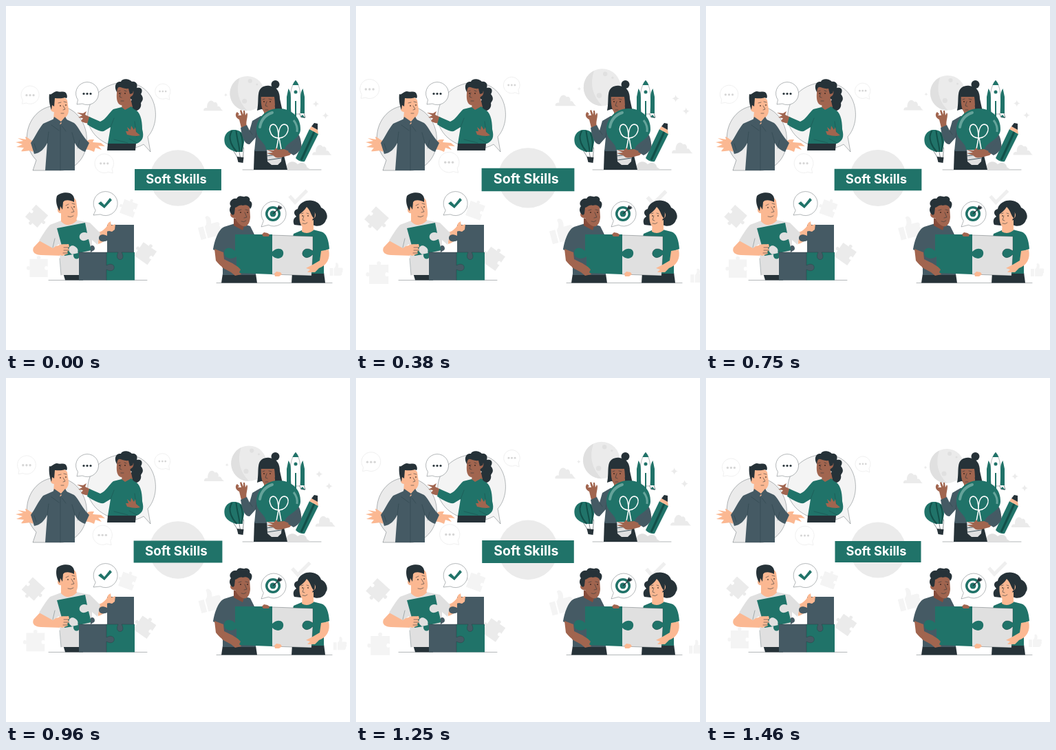
Animation, 500 px wide and 500 px high, one loop 1.54 s. Source, as an HTML page:

```html
<!DOCTYPE html>
<html lang="en">
<head>
<meta charset="utf-8">
<title>Soft Skills</title>
<style>
html, body { margin: 0; width: 100%; height: 100%; overflow: hidden; background: #fff }
svg { display: block; width: 100vw; height: 100vh }
.green { fill: #207369 } .slate { fill: #455a64 } .dark { fill: #263238 }
.peach { fill: #fbb892 } .brown { fill: #a1654f } .deep { fill: #854c3b }
.g1 { fill: #e0e0e0 } .g2 { fill: #ebebeb } .g3 { fill: #f4f4f4 } .white { fill: #fff }
.pen, .ground { fill: none; stroke: #263238; stroke-width: .55; stroke-linecap: round; stroke-linejoin: round }
.ground, .seam { stroke-width: .35 }
.fold { fill: none; stroke: #1b343b; stroke-width: .45; stroke-linecap: round; opacity: .7 }
.bubble { stroke: #263238; stroke-width: .35 }
.pale { fill: #fff; stroke: #ededed; stroke-width: .8 }
text { font: 700 18.2px Inter, sans-serif; fill: #fff; text-anchor: middle }
</style>
</head>
<body>
<svg viewBox="0 0 500 500">
<defs>
  <path id="piece" d="M-13-13H-2C-6-19 6-19 2-13H13V-2C7-6 7 6 13 2V13H-13V2C-19 6-19-6-13-2Z"/>
  <g id="dots"><circle cx="-5" r="1.6"/><circle r="1.6"/><circle cx="5" r="1.6"/></g>
  <path id="star" d="M0-5Q.7-.7 5 0Q.7.7 0 5Q-.7.7-5 0Q-.7-.7 0-5"/>
  <path id="cloud" d="M-14 7C-15 3-10 2-9 3C-10-6-3-11 1-5C4-7 7-3 6 1C10-1 10 5 14 7Z"/>
  <path id="thumb" d="M-15-3H-7V15H-15ZM-5-2C-1-5 0-9-1-15C4-19 8-11 5-4L14-4C18-3 17 2 15 2C18 4 16 8 14 8C16 11 13 15 10 15H-5Z"/>
</defs>

<g id="zoom">
  <g class="g2">
    <circle cx="250" cy="250" r="40.500"/>
    <circle cx="350" cy="128" r="25"/>
    <use href="#cloud" x="301" y="146"/>
    <use href="#cloud" x="458" y="210"/>
    <use href="#star" x="449" y="143"/><use href="#star" x="463" y="160"/>
    <use href="#star" transform="translate(319 130)scale(.5)"/>
    <use href="#piece" transform="translate(46 305)rotate(222)scale(.9)"/>
    <use href="#piece" transform="translate(203 359)rotate(35)scale(.9)"/>
  </g>
  <g class="g1">
    <path d="M339 105.500A25 25 0 0 0 350 153Q330 132 339 105.500Z"/>
    <circle cx="346" cy="139" r="3.500"/><circle cx="354" cy="110" r="3"/><circle cx="364" cy="115" r="1.500"/>
  </g>
  <g class="g3">
    <use href="#piece" x="49" y="380"/>
    <use href="#piece" transform="translate(179 294)rotate(20)scale(.8)"/>
    <use href="#thumb" transform="translate(294 321)rotate(-15)"/>
    <use href="#thumb" transform="translate(478 382)scale(.6)"/>
  </g>
  <path d="M411 276L419 285L436 268" fill="none" stroke="#efefef" stroke-width="5"/>
  <g class="pale">
    <path d="M25.900 137.500A13 13 0 1 1 31 141.800L25 143Z"/>
    <path d="M237 131.300A11 11 0 1 0 232.600 135L238 137Z"/>
    <path d="M154.700 236.900A13.700 13.700 0 1 0 149.300 241.400L156 243Z"/>
  </g>
  <g fill="#d6d6d6">
    <use href="#dots" x="36.500" y="130.500"/><use href="#dots" transform="translate(228 125)scale(.85)"/>
    <use href="#dots" x="143.500" y="229"/>
  </g>
  <path class="green" d="M187.500 237H312.500V268H187.500Z"/>
  <text x="247.500" y="258">Soft Skills</text>
</g>

<g id="talk">
  <path class="g2 bubble" d="M39 239L44 224C15 194 36 145 73 145C105 145 123 178 116 207C112 225 98 237 82 239Z"/>
  <path class="g3 bubble" d="M210 212L206 190C228 166 219 111 172 111C135 112 113 143 120 171C128 196 155 207 178 207C187 207 195 204 200 201Z"/>
  <path class="white bubble" d="M104.500 136.500A16.500 16.500 0 1 1 111 142L103 143Z"/>
  <use class="dark" href="#dots" x="118" y="127.500"/>

  <path class="peach" d="M43 199C36 195 32 191 28 190L29 194L17 192L25 196L14 198L24 201L15 205L26 206L22 211C29 212 34 208 39 212Z"/>
  <path class="peach" d="M115 198C120 193 124 194 128 194L126 198L138 199L144 204L134 203L139 209L130 206L128 212C123 210 120 208 115 209Z"/>
  <path class="slate" d="M70 164L54 171C47 179 42 191 36 199L41 215C50 214 56 207 60 199L57 239H100V199C104 207 109 210 115 212L121 199C111 190 106 176 99 170L86 164Z"/>
  <path class="fold" d="M60 199L62 183M100 199L96 184M79 174V239M66 173L77 181M81 174L87 182M104 207L107 195M44 209L41 200"/>
  <path class="peach" d="M70 151L69 166L79 172L87 164L87 157Z"/>
  <path class="peach" d="M67 138C74 129 86 131 89 137L91 151C91 160 85 165 80 163C76 161 73 158 71 154C65 155 63 148 67 145Z"/>
  <path class="dark" d="M66 151C63 144 62 134 63 128C66 130 69 124 74 124C80 126 86 122 88 128C90 132 88 136 86 133C80 135 74 134 71 134L70 146L67 144Z"/>
  <path class="pen" d="M76 141L80 140M84 139L88 140M83 145L86 150L83 151M80 156H84"/>
  <circle cx="79" cy="145" r=".8"/><circle cx="87" cy="144" r=".8"/>
  <path class="slate" d="M70 161L68 167L76 174L80 169L84 173L89 166L86 161L80 168Z"/>

  <path class="dark" d="M163 128C155 117 160 109 167 110C169 104 180 106 183 110C189 109 192 114 190 119C200 117 198 126 196 128C202 135 197 139 196 141C198 150 189 155 184 151C180 148 180 139 183 136Z"/>
  <path class="brown" d="M169 138L168 151L178 154L184 147L181 134Z"/>
  <path class="brown" d="M162 120C166 114 176 114 180 121C187 119 187 130 181 132C179 140 172 146 167 144C160 142 160 130 162 120Z"/>
  <path class="dark" d="M161 122C162 112 170 109 177 113C184 114 187 120 184 127L180 128L178 120C172 121 166 117 163 118Z"/>
  <path class="pen" d="M163 124L166 123M172 123L175 124M167 126L165 132L168 133M167 138L171 138"/>
  <circle cx="165" cy="127" r=".8"/><circle cx="173" cy="127" r=".8"/>
  <path class="brown" d="M123 162L115 158L117 153L112 156L103 155L111 159L105 162L112 163L109 167C113 171 118 169 122 172Z"/>
  <path class="green" d="M168 147L156 150C150 155 145 165 137 168L121 161L118 172C127 178 136 183 142 182L152 176L148 200H190C199 196 201 190 198 179C198 165 195 153 186 150L182 146L173 151Z"/>
  <path class="fold" d="M152 176L157 163M190 199L179 193M190 190L187 168M157 194L177 199"/>
  <path class="brown" d="M190 189C185 189 181 188 176 187L174 182L178 182L176 176L181 180L182 174L186 180L188 176L189 183L195 188Z"/>
  <path class="dark" d="M148 200H189L188 210H147Z"/>
</g>

<g id="ideas">
  <path class="ground" d="M344 238H458"/>
  <path class="g1" d="M407 238C407 224 419 224 424 230C431 224 438 231 437 234L443 238Z"/>
  <path class="white bubble" d="M421 108C431 120 429 148 427 157H415C412 142 411 120 421 108Z"/>
  <g class="green">
    <path d="M421 108Q424 111 425.500 115H416.500Q418 111 421 108ZM410.500 120Q414 125 414 133V156H408V132ZM431.500 120Q428 125 428 133V156H434V132Z"/>
    <path d="M420 138H422V162H420ZM411 158L407 163L414 161ZM431 158L435 163L428 161Z"/><circle cx="421" cy="125" r="2.500"/>
  </g>
  <path class="pen" d="M409 156L408 162H413L415 157M427 157L429 162H435L433 156"/>
  <path class="green" d="M421 221L441 179L454 186L434 226Q426 227 421 221Z"/>
  <path d="M429 224L448 183" stroke="#124f49" stroke-width="3"/>
  <path class="peach" d="M441 179L444 175L453 180L454 186Z"/>
  <path class="dark" d="M444 175L448 170L453 171L453 180Z"/>

  <g transform="translate(2.500)">
    <path class="pen" d="M327 209L334 220M343 206L342 220M336 210L338 220"/>
    <path class="green" d="M316 201C312 188 320 180 329 180C341 180 346 190 343 201L341 212H332C325 210 319 207 316 201Z"/>
    <path d="M326 181C318 193 328 207 333 212M332 181C333 193 337 204 337 212M338 184C343 194 341 204 340 212" fill="none" stroke="#124f49" stroke-width="2"/>
    <path class="dark" d="M333 219L343 220L342 228L335 227Z"/>
  </g>

  <path class="dark" d="M361 209H402L409 238H360Z"/>
  <path class="brown" d="M342 177L339 165C334 163 332 157 336 154L339 157L337 159L342 159L340 152L342 151L345 158L345 152L347 152L348 159L350 155L351 157C351 164 348 169 350 175Z"/>
  <path class="slate" d="M370 160L358 167L354 181L350 173L341 177C343 190 347 202 354 201L363 191L361 211H405L419 214C430 210 431 199 426 188L403 167L390 160Z"/>
  <path class="fold" d="M363 191L365 176M354 181L358 187"/>
  <circle class="dark" cx="391.500" cy="114" r="6"/>
  <path class="dark" d="M365 152C367 142 366 134 367 128C368 118 376 115 383 116C394 117 398 125 398 135L402 153H391L371 150Z"/>
  <path class="brown" d="M375 148V163L382 167L391 162V146Z"/>
  <path class="brown" d="M371 128H390L391 144C389 155 382 159 377 156C371 152 370 140 371 128Z"/>
  <path class="dark" d="M369 132C369 119 378 116 385 118C393 121 393 132 393 142L390 132Z"/>
  <path class="pen" d="M373 136L376 135M382 135L386 136M379 139L377 145L380 146M377 151H381"/>
  <circle cx="375" cy="139" r=".8"/><circle cx="384" cy="139" r=".8"/>
  <path class="g1" d="M379 206H402L400 226L395 231H386L380 226Z"/>
  <path d="M379 218L401 215M380 224L400 221" stroke="#455a64" stroke-width="1"/>
  <path class="green" d="M378 209C378 198 364 195 364 180C364 162 379 149 396 149C415 149 429 162 428 180C427 195 406 198 405 209Z"/>
  <path d="M369 176C371 164 378 158 387 155" fill="none" stroke="#65a39a" stroke-width="4" stroke-linecap="round"/>
  <path d="M418 166C422 171 424 176 423 183" fill="none" stroke="#65a39a" stroke-width="3"/>
  <path d="M393 208L396 192C382 191 380 173 388 172C396 172 396 186 396 192C396 184 397 172 405 172C414 173 411 191 397 192L400 208" fill="none" stroke="#fff" stroke-width="1.500"/>
  <path class="brown" d="M416 213L404 208L395 209L393 206L389 210L379 209L388 213L379 214L388 217L392 220C400 222 405 218 412 217Z"/>
  <path class="slate" d="M425 194C434 202 428 212 418 217L410 212Z"/>
</g>

<g id="build">
  <path class="ground" d="M62 398.500H205"/>
  <path class="white bubble" d="M130.200 297A17.500 17.500 0 1 1 137.100 302.900L127 304Z"/>
  <path class="green" d="M134 287L138 284L143 289L151 279L154 282L143 294Z"/>
  <path class="dark" d="M83 388H112V398.500H86Z"/>
  <path class="peach" d="M133 329C137 329 142 326 146 321L150 314L153 319C159 316 161 324 157 327L151 329C148 337 142 344 134 346Z"/>
  <path class="peach" d="M54 336L40 351C37 358 43 362 51 362L82 363L84 348L66 349L73 339Z"/>
  <path class="g1" d="M80 312L64 318C56 327 52 335 48 341L68 352L77 346L80 391H125V340L133 347L137 330L122 315L102 311Z"/>
  <path class="fold" d="M68 351L71 338M80 391L78 367" opacity=".3"/>
  <path class="peach" d="M80 297V313Q90 324 103 312L101 304Z"/>
  <path class="peach" d="M80 284C87 274 98 275 102 283L104 298C105 308 101 316 93 313C88 311 84 306 82 301C74 303 73 294 78 291Z"/>
  <path class="dark" d="M78 298C73 291 72 282 74 276C79 271 92 269 97 275C100 279 99 282 99 285C93 282 86 281 83 285L82 296L79 291Z"/>
  <path class="pen" d="M87 290L91 288M96 287L100 288M95 292L99 299L95 300M90 306Q94 308 98 305"/>
  <circle cx="90" cy="293" r=".8"/><circle cx="99" cy="292" r=".8"/>
  <path class="green" d="M74 323L115 315L118 330C110 326 104 334 108 339C113 344 118 339 120 339L124 355L106 359C111 369 97 371 98 361L85 363Z"/>
  <path class="slate" d="M123 349C128 345 132 355 126 356L123 358Z"/>
  <path class="g1" d="M96 361C86 355 94 344 101 350C107 354 103 358 105 359Z"/>
  <path class="peach" d="M75 349C80 345 86 347 91 346L92 350L90 352L92 355L89 357L90 360L82 363C76 362 72 356 75 349Z"/>
  <path class="pen" d="M84 351H91M84 355H91M83 359H89"/>
  <path class="green" d="M146 358H187V398.500H146Z"/>
  <path class="slate" d="M147 318H186V358H168C176 372 156 372 163 358H147V341C131 348 131 326 147 334Z"/>
  <path class="slate" d="M106 358H146V377C161 369 161 391 146 383V398.500H106Z"/>
  <path class="pen seam" d="M106 358H163C156 372 176 372 168 358H186M146 358V377C161 369 161 391 146 383V398"/>
  <path class="peach" d="M145 328L148 316L152 313L153 319L159 317L158 325L154 328L150 327Z"/>
</g>

<g id="team">
  <path class="ground" d="M306 402.500H474"/>
  <path class="white bubble" d="M374.300 312.300A18 18 0 1 1 381.400 318.300L371 321Z"/>
  <circle class="green" cx="388" cy="302" r="11"/><circle class="white" cx="388" cy="302" r="7.500"/>
  <circle class="green" cx="388" cy="302" r="4.500"/>
  <path d="M388 302L400 291" stroke="#263238" stroke-width="1.200"/><path class="dark" d="M394 294L397 289L398 292L402 293L398 296Z"/>

  <path class="dark" d="M315 389H363L365 402.500H313Z"/>
  <path class="slate" d="M333 316L317 321C308 325 303 342 301 354L315 360V391H363V336L355 320L345 317Z"/>
  <path class="brown" d="M303 353L305 370C311 378 317 382 327 386L333 391L342 390L339 386L341 382L334 378L329 374L317 368L316 358Z"/>
  <path class="deep" d="M331 308V319L344 326L348 315Z"/>
  <path class="brown" d="M330 291C337 284 350 285 354 292L355 307C354 318 349 323 342 319C337 316 334 311 333 308C325 309 324 300 330 299Z"/>
  <path class="dark" d="M330 304C324 301 324 294 327 291C322 285 330 278 335 280C339 273 344 278 347 277C352 275 356 281 354 283C359 285 358 291 355 295C353 290 350 288 344 290C339 288 336 293 333 293L332 302Z"/>
  <path class="pen" d="M338 297L342 296M348 296L352 297M347 300L350 307L346 308M342 313Q346 315 349 312"/>
  <circle cx="341" cy="300" r=".8"/><circle cx="351" cy="300" r=".8"/>

  <path class="dark" d="M416 387H462L464 402.500H415Z"/>
  <path class="green" d="M430 326L418 331L414 348L415 389H462V356L470 353C469 340 466 330 458 328L446 325Z"/>
  <path class="dark" d="M432 285C441 280 455 283 458 293C466 296 469 307 465 311C463 319 452 322 446 318L428 319L419 318C417 314 417 309 422 306C416 300 420 296 424 295C425 290 428 287 432 285Z"/>
  <path class="peach" d="M431 316L430 328Q438 333 447 326L447 311Z"/>
  <path class="peach" d="M427 298C430 288 440 288 445 298C452 299 451 309 446 309C443 318 437 324 431 321C426 317 426 306 427 298Z"/>
  <path class="dark" d="M426 303C424 293 430 286 438 288C447 289 451 299 448 309C443 305 444 299 437 292C434 297 430 300 426 303Z"/>
  <path class="pen" d="M429 302L432 301M437 301L440 302M433 305L431 311L434 312M431 316Q435 318 438 315"/>
  <circle cx="431" cy="305" r=".8"/><circle cx="439" cy="305" r=".8"/>

  <path class="g1" d="M387 333L446 335V356C434 347 427 360 433 364C437 368 443 364 446 361L444 392L387 390Z"/>
  <path class="green" d="M333 332L387 332V357C395 349 405 353 403 361C401 369 391 368 387 363V390L335 388V364C327 370 317 366 317 359C317 350 327 350 333 356Z"/>
  <path class="green" d="M446 356C434 347 427 360 433 364C437 368 443 364 446 361Z"/>
  <path class="pen seam" d="M387 333L446 335V356C434 347 427 360 433 364C437 368 443 364 446 361L444 392L387 390"/>
  <path class="brown" d="M372 332L375 329L380 330L383 332L382 335H374Z"/>
  <path class="brown" d="M315 369L329 374L337 379L341 383L339 387L342 390L333 392L327 387L314 380Z"/>
  <path class="peach" d="M390 389L393 386L399 387L401 390L397 393H391Z"/>
  <path class="peach" d="M458 356L469 354C472 367 466 377 455 381L449 387L438 387L442 383L436 381L444 377L456 370Z"/>
</g>
</svg>
<script>
const LOOP = 1540, FPS = 24, LAST_STEP = 35, GROWTH = .078;
// [ms, zoom amount]; the outer pairs only shape the end slopes
const keys = [
  [-40, 0], [0, .09], [170, .88], [280, 1.08], [380, 1], [560, .68], [750, .18],
  [825, .15], [960, .4], [1090, .77], [1180, .97], [1250, .88], [1460, 0], [1540, 0]
];
const zoom = document.getElementById('zoom');

const slope = i => (keys[i + 1][1] - keys[i - 1][1]) / (keys[i + 1][0] - keys[i - 1][0]);

function amountAt(t) {
  let i = 1;
  while (i < keys.length - 3 && t > keys[i + 1][0]) i++;
  const [t0, a] = keys[i], [t1, b] = keys[i + 1];
  const span = t1 - t0, u = (t - t0) / span, v = 1 - u;
  return v * v * (1 + 2 * u) * a + u * u * (3 - 2 * u) * b
    + span * u * v * (v * slope(i) - u * slope(i + 1));
}

function draw(now) {
  const step = Math.min(Math.floor(now % LOOP * FPS / 1000 + .05), LAST_STEP);
  const scale = 1 + GROWTH * amountAt(step * 1000 / FPS);
  zoom.setAttribute('transform', `translate(250 252) scale(${scale}) translate(-250 -252)`);
  requestAnimationFrame(draw);
}
draw(performance.now());
</script>
</body>
</html>
```
